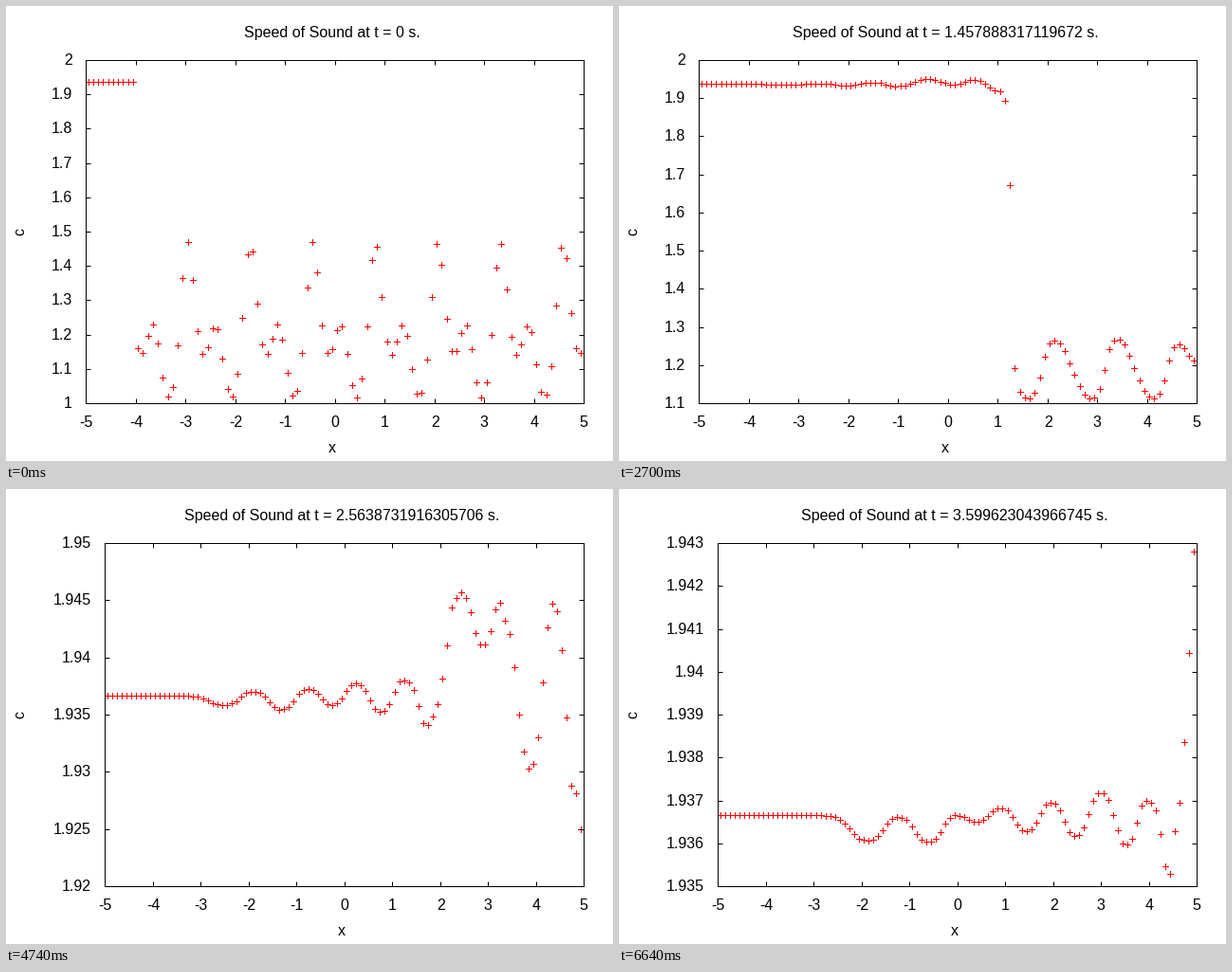
Recreate the animation shown at these times as a matplotlib script. Size 640x480 px, loop 6660 ms.

```python
import numpy as np
import matplotlib.pyplot as plt
from matplotlib.animation import FuncAnimation

plt.rcParams.update({"font.family": "Liberation Sans", "font.size": 14.4,
                     "path.simplify": False})

FRAMES, GAMMA, N = 333, 1.4, 100
RIGHT, TOP, BOTTOM = 609, 57, 419
DX = 10 / N
x = -5 + DX * (np.arange(N) + 0.5)

# Solver clock: step count against simulated seconds
clock = np.interp(
    np.arange(FRAMES), [0, 42, 83, 135, 213, 260, 332],
    [0, 0.4549476970567132, 0.8962918370826674, 1.457888317119672,
     2.303175464209172, 2.813708513742744, 3.599623043966745])


# Euler equations: a Mach 3 shock running into a density wave
def conserved(w):
    rho, u, p = w
    return np.array([rho, rho * u, p / (GAMMA - 1) + rho * u * u / 2])


def primitive(q):
    rho, m, e = q
    u = m / rho
    return np.array([rho, u, (GAMMA - 1) * (e - m * u / 2)])


def sound(w):
    return np.sqrt(GAMMA * w[2] / w[0])


def flux(w):
    rho, u, p = w
    e = p / (GAMMA - 1) + rho * u * u / 2
    return np.array([rho * u, rho * u * u + p, u * (e + p)])


def rate(q):
    w = np.pad(primitive(q), ((0, 0), (2, 2)), mode="edge")
    d = np.diff(w)
    a, b = d[:, :-1], d[:, 1:]
    same = a * b > 0
    slope = np.where(same, 2 * a * b / np.where(same, a + b, 1), 0)
    left = w[:, 1:-2] + slope[:, :-1] / 2
    right = w[:, 2:-1] - slope[:, 1:] / 2
    speed = np.maximum(abs(left[1]) + sound(left), abs(right[1]) + sound(right))
    f = (flux(left) + flux(right)
         - speed * (conserved(right) - conserved(left))) / 2
    return -np.diff(f) / DX


def simulate():
    wave = 1 + 0.2 * np.sin(5 * x) - 0.2 * np.sin(10 * x)
    behind = x < -4
    q = conserved(np.array([np.where(behind, 3.857143, wave),
                            np.where(behind, 2.629369, 0.0),
                            np.where(behind, 10.33333, 1.0)]))
    out = [sound(primitive(q))]
    for dt in np.diff(clock):
        q1 = q + dt * rate(q)
        q = (q + q1 + dt * rate(q1)) / 2
        out.append(sound(primitive(q)))
    return out


curves = simulate()

fig = plt.figure(figsize=(8, 6), dpi=80, facecolor="white")
ax = fig.add_axes([0, 0, 1, 1])
ax.set_xlim(0, 640)
ax.set_ylim(480, 0)
ax.axis("off")


def stroke(color, z):
    return ax.plot([], [], color=color, lw=0.9, zorder=z, snap=False,
                   solid_capstyle="butt", solid_joinstyle="miter")[0]


points, ticks, border = stroke("red", 2), stroke("black", 3), stroke("black", 3)
border.set_solid_capstyle("projecting")
title = ax.text(0, 33, "", ha="center")
xlabel = ax.text(0, 471, "x", ha="center")
ax.text(14.5, 238.5, "c", rotation=90, ha="center", va="center")
xtexts = [ax.text(0, 444, str(k), ha="center") for k in range(-5, 6)]
ytexts = [ax.text(0, 0, "") for _ in range(24)]


def segments(x0, y0, x1, y1):
    x0, y0, x1, y1 = np.broadcast_arrays(x0, y0, x1, y1)
    gap = np.full(x0.shape, np.nan)
    return (np.stack([x0, x1, gap], -1).ravel() + 0.5,
            np.stack([y0, y1, gap], -1).ravel() + 0.5)


def join(*parts):
    return [np.concatenate(p) for p in zip(*parts)]


def tick_step(span):
    power = 10.0 ** np.floor(np.log10(span))
    density = 20 * power / span
    for limit, step in ((40, 0.05), (20, 0.1), (10, 0.2), (4, 0.5), (2, 1)):
        if density > limit:
            return step * power
    return 2 * power


def advance(s):
    return 16 * sum(0.278 if ch == "." else 0.556 for ch in s)


def pixel(v):
    return np.floor(v + 0.5)


def draw(i):
    c = curves[i]
    step = tick_step(np.ptp(c))
    k0, k1 = int(np.floor(c.min() / step)), int(np.ceil(c.max() / step))
    labels = [f"{round(k * step, 9):g}" for k in range(k0, k1 + 1)]
    left = 54 + 10 * max(map(len, labels))
    width = RIGHT - left

    def to_x(v):
        return pixel(left + (v + 5) / 10 * width)

    def to_y(v):
        return pixel(BOTTOM - (v / step - k0) / (k1 - k0) * (BOTTOM - TOP))

    px, py = to_x(x), to_y(c)
    points.set_data(*join(segments(px - 3.5, py, px + 3.5, py),
                          segments(px, py - 3.5, px, py + 3.5)))

    tx = to_x(np.arange(-5, 6))
    ty = to_y(np.arange(k0, k1 + 1) * step)
    ticks.set_data(*join(segments(left, ty, left + 5, ty),
                         segments(RIGHT - 5, ty, RIGHT, ty),
                         segments(tx, TOP, tx, TOP + 5),
                         segments(tx, BOTTOM - 5, tx, BOTTOM)))
    border.set_data(np.array([left, RIGHT, RIGHT, left, left]) + 0.5,
                    np.array([TOP, TOP, BOTTOM, BOTTOM, TOP]) + 0.5)

    for text, pos in zip(xtexts, tx):
        text.set_x(pos + 0.3)
    for text in ytexts:
        text.set_text("")
    for text, pos, s in zip(ytexts, ty, labels):
        text.set_text(s)
        text.set_position((left - 14.3 - advance(s), pos + 5))

    middle = (left + RIGHT) / 2
    seconds = repr(float(clock[i])) if i else "0"
    title.set_text(f"Speed of Sound at t = {seconds} s.")
    title.set_x(middle - 2.3)
    xlabel.set_x(middle - 3)
    return []


anim = FuncAnimation(fig, draw, frames=FRAMES, interval=20, repeat=True,
                     repeat_delay=0, cache_frame_data=False)
plt.show()
```
